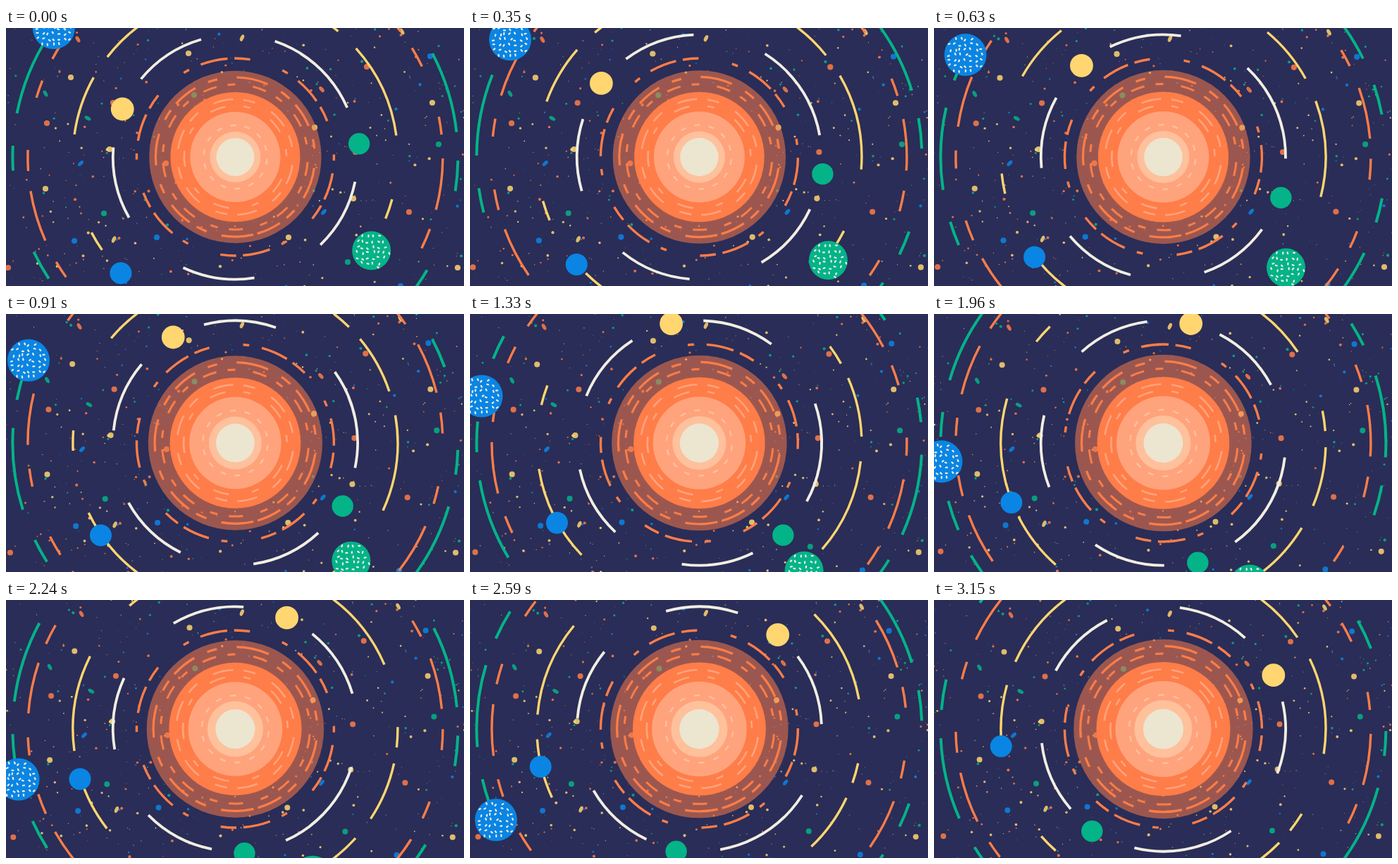
Write an HTML page with a canvas that moves like this. It is 650x366 px and loops after 3.22 s.

```html
<!DOCTYPE html>
<html lang="en">
<head>
<meta charset="utf-8">
<title>Orbits</title>
<style>
html, body { margin: 0; width: 100%; height: 100%; overflow: hidden; background: #2a2d57; }
canvas { display: block; width: 650px; height: 366px; }
</style>
</head>
<body>
<canvas id="stage" width="650" height="366"></canvas>
<script>
const ctx = document.getElementById('stage').getContext('2d');
const W = 650, H = 366, CX = 325.4, CY = 183;
const LOOP = 3220, STEP = 70, TAU = Math.PI * 2;
const C = {
  navy: '#2a2d57', cream: '#f1eee2', yellow: '#ffd670', green: '#04b388',
  orange: '#ff7d48', blue: '#0a85e4', salmon: '#ffa37d', peach: '#ffc09c', core: '#ece5cf'
};
const rad = d => d * Math.PI / 180;

function rng(seed) {
  return () => {
    seed = (seed + 0x6d2b79f5) | 0;
    let x = Math.imul(seed ^ (seed >>> 15), 1 | seed);
    x = (x + Math.imul(x ^ (x >>> 7), 61 | x)) ^ x;
    return ((x ^ (x >>> 14)) >>> 0) / 4294967296;
  };
}

function disc(x, y, r, color) {
  ctx.fillStyle = color;
  ctx.beginPath();
  ctx.arc(x, y, r, 0, TAU);
  ctx.fill();
}

// Repeats a group of [offset, length] dashes n times, in degrees clockwise
const dashes = (first, step, n, group) =>
  Array.from({ length: n }, (_, i) => first + i * step)
    .flatMap(s => group.map(([off, len]) => [s + off, len]));

function ring(r, width, color, arcs, shift = 0) {
  ctx.strokeStyle = color;
  ctx.lineWidth = width;
  ctx.lineCap = 'butt';
  ctx.beginPath();
  for (const [a, len] of arcs) {
    const s = rad(a + shift), e = rad(a + len + shift);
    ctx.moveTo(CX + r * Math.cos(s), CY + r * Math.sin(s));
    ctx.arc(CX, CY, r, s, e);
  }
  ctx.stroke();
}

// Orbit rings; the groups do not quite divide the circle
const CREAM = [...dashes(11.7, 69.3, 5, [[0, 34.2]]), [302, 34.2]];
const YELLOW = dashes(-72, 130, 3, [[0, 21.3], [30, 34.4], [87.1, 7.2]]);
const ORANGE = dashes(-115.1, 51.95, 7, [[0, 5], [11.6, 14.3], [31.5, 5.8]]);
const GREEN = dashes(-115.5, 73, 5, [[0, 6.4], [14.8, 21.3], [43.4, 7.9]]);
const INNER = dashes(9.5, 60, 6, [[0, 16], [20, 9.2], [49, 3.6]]);

// Dashes on the sun
const HALO_OUT = dashes(77, 97, 4, [[0, 23], [34, 8], [48, 18], [76, 7]]);
const HALO_IN = dashes(4, 40, 9, [[0, 11], [20, 6]]);
const BODY_OUT = dashes(8, 60, 6, [[0, 20], [30, 12]]);
const BODY_IN = dashes(25, 72, 5, [[0, 18], [38, 8]]);
const GLOW = dashes(4, 360 / 14, 14, [[0, 10]]);

// The confetti that stands out; the rest is scattered at random
const DOTS = {
  yellow: [[259, 36], [92, 70], [605, 106], [147, 172], [56, 228], [493, 242], [401, 297], [438, 141], [641, 340]],
  orange: [[58, 135], [572, 261], [512, 55], [152, 106], [496, 176], [3, 340], [227, 192]],
  green: [[139, 263], [614, 165], [485, 332], [267, 95]],
  blue: [[214, 297], [602, 40], [97, 302], [560, 366]]
};
const OVALS = {
  yellow: [[335, 14, -65], [153, 300, -65], [562, 5, 60]],
  orange: [[102, 16, 60], [448, 87, 50]],
  green: [[116, 128, 30], [56, 93, 60]],
  blue: [[106, 192, -45], [451, 261, -50]]
};
const SPECKS = (() => {
  const rnd = rng(41), names = ['yellow', 'orange', 'green', 'blue', 'yellow', 'orange'];
  return Array.from({ length: 480 }, () => [
    rnd() * 690 - 15, rnd() * 400 - 15,
    0.5 + 1.7 * rnd() ** 3,
    C[names[Math.floor(rnd() * names.length)]]
  ]);
})();

function confetti(zoom) {
  ctx.save();
  ctx.translate(CX, CY);
  ctx.scale(zoom, zoom);
  ctx.translate(-CX, -CY);
  ctx.globalAlpha = 0.85;
  for (const s of SPECKS) disc(...s);
  for (const name in DOTS) {
    for (const [x, y] of DOTS[name]) disc(x, y, 4.1, C[name]);
    for (const [x, y, deg] of OVALS[name]) {
      ctx.beginPath();
      ctx.ellipse(x, y, 4.9, 2.6, rad(deg), 0, TAU);
      ctx.fill();
    }
  }
  ctx.restore();
}

function sun(k) {
  const grow = (from, to) => from + (to - from) * k;
  const halo = grow(122.2, 127.2), body = grow(92, 95);
  ctx.globalAlpha = 0.53;
  disc(CX, CY, halo, C.orange);
  ctx.globalAlpha = 1;
  ring(halo * 0.925, 3.2, C.orange, HALO_OUT);
  ring(halo * 0.842, 3, C.orange, HALO_IN);
  disc(CX, CY, body, C.orange);
  ring(body * 0.89, 2.6, C.salmon, BODY_OUT);
  ring(body * 0.79, 2.6, C.salmon, BODY_IN);
  disc(CX, CY, grow(64, 68), C.salmon);
  ring(grow(45, 48.5), 2.4, C.peach, GLOW);
  disc(CX, CY, grow(36, 41), C.peach);
  disc(CX, CY, grow(27, 28.5), C.core);
}

// Short strokes scattered evenly over a disc
function flecks(r, seed) {
  const rnd = rng(seed), out = [], gap = 7.6;
  for (let y = -r; y <= r; y += gap)
    for (let x = -r; x <= r; x += gap) {
      const px = x + (rnd() - 0.5) * 4, py = y + (rnd() - 0.5) * 4, a = rnd() * Math.PI;
      if (Math.hypot(px, py) < r - 1.5) out.push([px, py, Math.cos(a), Math.sin(a)]);
    }
  return out;
}

function planet(orbit, deg, r, color, marks = []) {
  const x = CX + orbit * Math.cos(rad(deg)), y = CY + orbit * Math.sin(rad(deg));
  disc(x, y, r, color);
  ctx.save();
  ctx.clip();
  ctx.strokeStyle = C.cream;
  ctx.lineWidth = 2.2;
  ctx.lineCap = 'round';
  ctx.beginPath();
  for (const [px, py, dx, dy] of marks) {
    ctx.moveTo(x + px - dx, y + py - dy);
    ctx.lineTo(x + px + dx, y + py + dy);
  }
  ctx.stroke();
  ctx.restore();
}

const BLUE_MARKS = flecks(30, 5), GREEN_MARKS = flecks(27.5, 12);

function draw(k) {
  // One shared turn drives most layers, each at its own ratio
  const turn = 131 * (0.952 * k + 0.048 * k * k);
  const sway = 116.4 * (k - 0.013 * Math.sin(TAU * k));
  ctx.fillStyle = C.navy;
  ctx.fillRect(0, 0, W, H);
  confetti(1 - 0.032 * k);
  ring(316, 4, C.green, GREEN, -0.786 * turn);
  ring(294.5, 3.4, C.orange, ORANGE, -0.786 * turn);
  ring(230.5, 3.4, C.yellow, YELLOW, sway);
  ring(173.6, 3.8, C.cream, CREAM, 0.973 * turn);
  ring(140, 3.4, C.orange, INNER, -0.655 * turn);
  sun(k);
  planet(316, 215.4 - 78.4 * k ** 1.41, 30, C.blue, BLUE_MARKS);
  planet(234.5, 34.5 + 0.3 * turn, 27.5, C.green, GREEN_MARKS);
  planet(231.5, 134.6 + 0.3 * turn, 15.5, C.blue);
  planet(174, 203 + turn, 16.4, C.yellow);
  planet(176.7, 353.9 + turn, 15.2, C.green);
}

const begin = performance.now();
function frame() {
  const t = (performance.now() - begin) % LOOP;
  draw(Math.floor(t / STEP) * STEP / (LOOP - STEP));
  requestAnimationFrame(frame);
}
frame();
</script>
</body>
</html>
```
